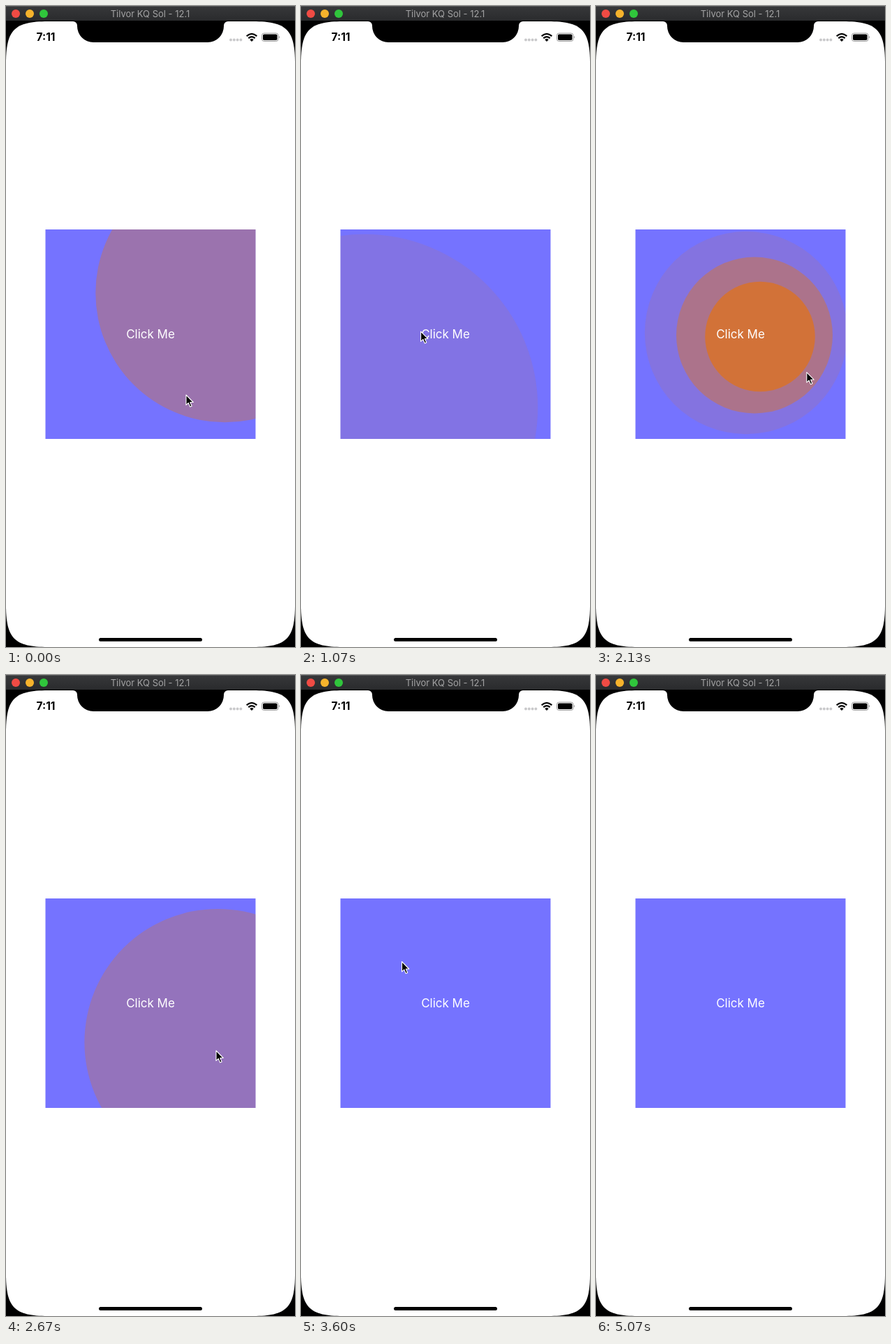
These frames come from a looping animation (414x918 px, 5590 ms). An HTML page:

```html
<!DOCTYPE html>
<html lang="en">
<head>
<meta charset="utf-8">
<title>Ripple button</title>
<style>
  html, body { margin: 0; width: 100%; height: 100%; overflow: hidden; background: #000; }
  svg { display: block; width: 414px; height: 918px; }
  text { font-family: Inter, Roboto, sans-serif; text-anchor: middle; }
</style>
</head>
<body>
<svg viewBox="0 0 414 918">
  <defs>
    <linearGradient id="bar" x2="0" y2="1">
      <stop stop-color="#37383a"/>
      <stop offset="1" stop-color="#2a2b2d"/>
    </linearGradient>
    <clipPath id="box"><rect x="56.5" y="320" width="301" height="300"/></clipPath>
  </defs>

  <rect width="414" height="21" fill="url(#bar)"/>
  <rect width="414" height="1" fill="#555658"/>
  <circle cx="14" cy="11" r="6" fill="#f04b44"/>
  <circle cx="34" cy="11" r="6" fill="#f6b32c"/>
  <circle cx="54" cy="11" r="6" fill="#30c53c"/>
  <text x="206.5" y="16" font-size="13" fill="#a2a2a3">Tilvor KQ Sol - 12.1</text>

  <path fill="#fff" d="M0 82c0-48 12-60 60-60H354c48 0 60 12 60 60V858c0 48-12 60-60 60H60c-48 0-60-12-60-60Z"/>
  <path d="M96 22a6 6 0 0 1 6 6v1a23 23 0 0 0 23 23H289a23 23 0 0 0 23-23v-1a6 6 0 0 1 6-6Z"/>
  <text x="57" y="50" font-size="15.5" font-weight="700">7:11</text>
  <path d="M322 48.5H337" stroke="#c9c9cb" stroke-width="4" stroke-linecap="round" stroke-dasharray="0 4.8"/>
  <g fill="none" stroke="#000" stroke-width="2.3">
    <path d="M344.7 43.2Q352 36.6 359.3 43.2"/>
    <path d="M347.3 46.2Q352 42 356.7 46.2"/>
  </g>
  <path d="M349.3 48.2Q352 46 354.7 48.2L352 51Z"/>
  <rect x="366.5" y="39" width="23.5" height="11.5" rx="3.2" fill="none" stroke="#999"/>
  <rect x="368" y="40.5" width="20.5" height="8.5" rx="1.8"/>
  <path d="M391 42.8Q393 44.7 391 46.6Z" fill="#999"/>

  <g clip-path="url(#box)">
    <rect width="414" height="918" fill="#7573ff"/>
    <g id="ripples" fill="#ec7300"/>
  </g>
  <text x="207" y="476" font-size="17" fill="#fff">Click Me</text>
  <rect x="133" y="905" width="148" height="5" rx="2.5"/>
  <path id="cursor" d="M0 0V14.4L3.3 11.4L5.7 17L8.1 16L5.8 10.5H10.3Z"
        stroke="#fff" stroke-width="1.1" stroke-linejoin="round"/>
</svg>
<script>
  const LOOP = 5590, STEP = 1000 / 15, GROW = 500;
  const MID = { x: 207, y: 470 }, HALF = 150;

  const stop = (time, x, y, tap = true) => ({ time, x, y, tap });
  const hover = (time, x, y) => stop(time, x, y, false);

  // The pointer eases from stop to stop; each tap starts a ripple.
  const stops = [
    stop(-361, 313.5, 411), hover(0, 258, 557),
    stop(218, 252.5, 571), stop(600, 91, 575),
    stop(1233, 172, 465.5), stop(1507, 211, 465),
    stop(1674, 215, 468), stop(1804, 227, 471.5), stop(1912, 235, 473.5),
    stop(2279, 303.5, 526), hover(2667, 301, 538),
    stop(3040, 255, 480), stop(3600, 144.5, 410.5),
    stop(4275, 143, 412), hover(4790, -14, -24)
  ];

  const group = document.getElementById('ripples');
  const cursor = document.getElementById('cursor');

  const ripples = stops.filter(s => s.tap).map(({ time, x, y }) => {
    const el = document.createElementNS('http://www.w3.org/2000/svg', 'circle');
    el.setAttribute('cx', x);
    el.setAttribute('cy', y);
    group.append(el);
    // Each ripple ends at the farthest side of the button.
    const reach = HALF + Math.max(Math.abs(x - MID.x), Math.abs(y - MID.y));
    return { el, time, reach };
  });

  function pointerAt(t) {
    const i = stops.findIndex(s => s.time > t);
    if (i < 0) return [-14, -24];
    const a = stops[i - 1], b = stops[i];
    const k = (t - a.time) / (b.time - a.time), e = 1 - (1 - k) ** 4;
    return [a.x + (b.x - a.x) * e, a.y + (b.y - a.y) * e];
  }

  function draw(t) {
    for (const { el, time, reach } of ripples) {
      const p = (t - time) / GROW, on = p > 0 && p < 1;
      el.setAttribute('r', on ? p * reach : 0);
      el.setAttribute('opacity', on ? Math.min(1, 1.04 - p) : 0);
    }
    cursor.setAttribute('transform', `translate(${pointerAt(t)})`);
  }

  const origin = performance.now();
  function tick() {
    const t = (performance.now() - origin) % LOOP;
    draw(Math.floor((t + 4) / STEP) * STEP);
    requestAnimationFrame(tick);
  }
  tick();
</script>
</body>
</html>
```
